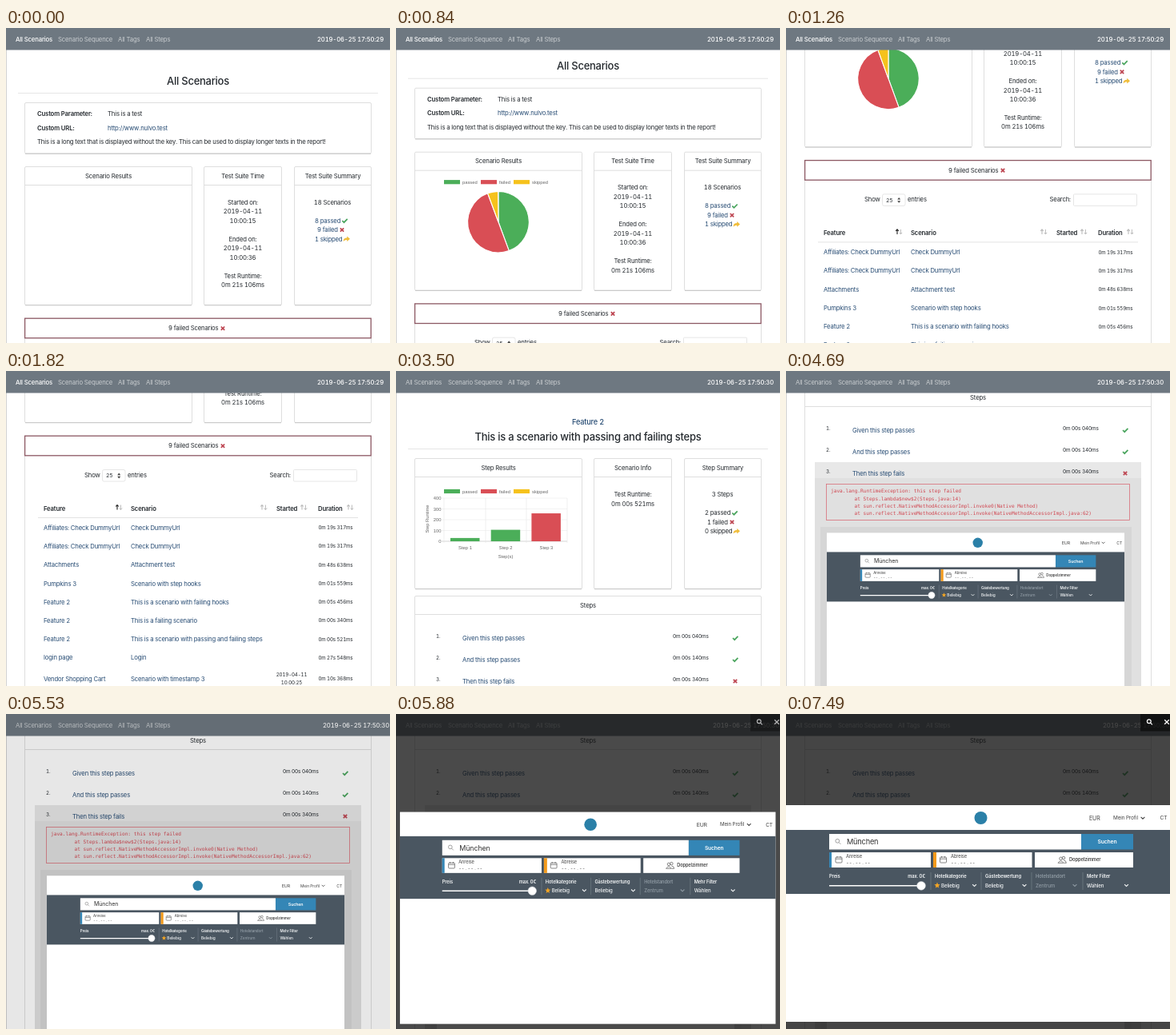
An HTML page that plays this animation: 480 px wide and 394 px high, repeating every 7560 ms.

```html
<!DOCTYPE html>
<html lang="en">
<head>
<meta charset="utf-8">
<title>Test report</title>
<style>
html, body { margin: 0; width: 100%; height: 100%; overflow: hidden; background: #fff; }
svg { display: block; width: 480px; height: 394px; }
text { font-family: Inter, Roboto, sans-serif; letter-spacing: -.02em; font-variant-numeric: tabular-nums; white-space: pre; }
.mono { font-family: "DejaVu Sans Mono", "Liberation Mono", monospace; letter-spacing: 0; }
.chart { font-family: "Liberation Sans", Arial, sans-serif; letter-spacing: 0; }
</style>
</head>
<body>
<svg id="stage" viewBox="0 0 480 394"></svg>
<script>
const LOOP = 7560;
const INK = '#24292e', LINK = '#264b73', LINE = '#dedede', FIELD = '#e6e6e6';
const GREEN = '#4bae59', RED = '#d94e55', YELLOW = '#f6c21c', BLUE = '#3486b6';

// --- drawing helpers (text y is the middle of the line) ---
const text = (x, y, str, { size = 7.7, fill = INK, anchor = 'start', weight = 400, cls = '', more = '' } = {}) =>
  `<text x="${x}" y="${(y + size * .36).toFixed(2)}" font-size="${size}" fill="${fill}" text-anchor="${anchor}" font-weight="${weight}" class="${cls}" ${more}>${str}</text>`;
const mid = (x, y, str, opt) => text(x, y, str, { anchor: 'middle', ...opt });
const end = (x, y, str, opt) => text(x, y, str, { anchor: 'end', ...opt });
const rect = (x, y, w, h, fill, more = '') =>
  `<rect x="${x}" y="${y}" width="${w}" height="${h}" fill="${fill}" ${more}/>`;
const path = (d, stroke, width = 1, more = '') =>
  `<path d="${d}" fill="none" stroke="${stroke}" stroke-width="${width}" ${more}/>`;
const hline = (x1, x2, y, color = LINE, w = 1) => path(`M${x1} ${y}H${x2}`, color, w);
const group = (id, body, more = '') => `<g id="${id}" ${more}>${body}</g>`;

const check = (x, y) => path(`M${x - 3} ${y}l2.2 2.2l4.2 -4.4`, '#48a45c', 1.7);
const cross = (x, y) => path(`M${x - 2.2} ${y - 2.2}l4.4 4.4m0 -4.4l-4.4 4.4`, '#bd4450', 1.7);
const share = (x, y) =>
  `<path d="M${x - 4} ${y + 3}q-.6 -4.6 4.4 -4.6v-2l3.8 3.4l-3.8 3.2v-2q-3 -.2 -4.4 2z" fill="#f0bd3a"/>`;
const chevron = (x, y, color) => path(`M${x - 2.4} ${y - 1.2}l2.4 2.4l2.4 -2.4`, color, 1.1);
const glass = (x, y, color, w = 1) =>
  `<circle cx="${x - .7}" cy="${y - .7}" r="2.4" fill="none" stroke="${color}" stroke-width="${w}"/>` +
  path(`M${x + 1.1} ${y + 1.1}l2.3 2.3`, color, w);
const sortIcon = (x, y, up = '#bbb') =>
  path(`M${x - 2} ${y + 3}v-6m-1.8 2l1.8 -2l1.8 2`, up, 1.1) +
  path(`M${x + 2.4} ${y - 3}v6m-1.8 -2l1.8 2l1.8 -2`, '#bbb', 1);

const card = (x, y, w, h, title, bar = 23) =>
  rect(x + .5, y + .5, w - 1, h - 1, '#fff', `stroke="${LINE}" rx="1.5"`) +
  hline(x + 1, x + w - 1, y + h - .3, '#c6c6c6') +
  (title ? hline(x, x + w, y + bar + .5) + mid(x + w / 2, y + bar / 2 + .3, title) : '');

const summary = (y, total, passed, failed, skipped, fill) =>
  mid(408, y, total) +
  text(386, y + 23, passed, { fill }) + check(423.3, y + 23) +
  text(389, y + 34.5, failed, { fill }) + cross(420, y + 34.5) +
  text(386, y + 46, skipped, { fill }) + share(425.8, y + 46);

const navBar = (id, active, time) => {
  const items = [[12, 'All Scenarios'], [65, 'Scenario Sequence'], [140, 'All Tags'], [175, 'All Steps']];
  return rect(0, 0, 480, 27.5, '#6e7881') +
    items.map(([x, s], i) => text(x, 14, s, { fill: i === active ? '#fff' : '#c9cdd0', weight: i === active ? 500 : 400 })).join('') +
    end(472, 14, time, { fill: '#fff', weight: 500, more: `id="${id}"` });
};

const legend = y => [[60, GREEN, 'passed'], [106, RED, 'failed'], [147, YELLOW, 'skipped']]
  .map(([x, c, s]) => rect(x, y - 2.6, 20, 5.2, c) + text(x + 23, y, s, { size: 5.8, fill: '#666', cls: 'chart' })).join('');

// --- overview page ---
function overview() {
  const bold = { weight: 600 };
  const rows = [
    ['Affiliates: Check DummyUrl', 'Check DummyUrl', '0m 19s 317ms', 478],
    ['Affiliates: Check DummyUrl', 'Check DummyUrl', '0m 19s 317ms', 501],
    ['Attachments', 'Attachment test', '0m 48s 638ms', 524.5],
    ['Pumpkins 3', 'Scenario with step hooks', '0m 01s 559ms', 548],
    ['Feature 2', 'This is a scenario with failing hooks', '0m 05s 456ms', 571],
    ['Feature 2', 'This is a failing scenario', '0m 00s 340ms', 594],
    ['Feature 2', 'This is a scenario with passing and failing steps', '0m 00s 521ms', 617.3],
    ['login page', 'Login', '0m 27s 548ms', 640.5],
    ['Vendor Shopping Cart', 'Scenario with timestamp 3', '0m 10s 368ms', 667]
  ];
  const times = [[218, 'Started on:'], [229.5, '2019-04-11'], [241, '10:00:15'], [264, 'Ended on:'],
    [275.5, '2019-04-11'], [287, '10:00:36'], [310, 'Test Runtime:'], [321.3, '0m 21s 106ms']];
  return mid(240, 66, 'All Scenarios', { size: 13, weight: 500 }) + hline(15, 465, 81.5, '#e6e6e6') +
    card(23, 93, 434, 64.5) +
    text(39, 107.5, 'Custom Parameter:', bold) + text(127, 107.5, 'This is a test') +
    text(39, 125, 'Custom URL:', bold) + text(127, 125, 'http://www.nulvo.test', { fill: LINK }) +
    text(39, 142.5, 'This is a long text that is displayed without the key. This can be used to display longer texts in the report!') +
    card(23, 173, 210, 174, 'Scenario Results') + card(247, 173, 98, 174, 'Test Suite Time') +
    card(360, 173, 97, 174, 'Test Suite Summary') +
    group('pieChart', legend(211) + group('pie', '')) +
    times.map(([y, s]) => mid(296, y, s)).join('') +
    summary(218, '18 Scenarios', '8 passed', '9 failed', '1 skipped', LINK) +
    path('M23.5 388V760M456.5 388V760', LINE) +
    rect(23.6, 363.2, 432.6, 24.6, '#fff', 'stroke="#8c5863" stroke-width="1.3"') +
    text(203, 375.7, '9 failed Scenarios') + cross(271, 375.7) +
    text(98, 412, 'Show') + text(152, 412, 'entries') +
    rect(120.5, 405.5, 28.5, 14.5, '#fff', `stroke="${FIELD}" rx="2"`) + text(125, 413, '25', { size: 6.8 }) +
    `<path d="M139.2 412.2l2 -2.6l2 2.6zM139.2 413.8l2 2.6l2 -2.6z" fill="#444"/>` +
    end(356, 412, 'Search:') + rect(359.5, 405.5, 79, 14.5, '#fff', `stroke="${FIELD}" rx="1"`) +
    [[47, 'Feature'], [156, 'Scenario'], [338, 'Started'], [390, 'Duration']].map(([x, s]) => text(x, 454, s, bold)).join('') +
    sortIcon(141, 452.5, '#222') + [322, 372, 430].map(x => sortIcon(x, 452.5)).join('') +
    hline(40, 440, 465.5, '#e2e2e2') +
    rows.map(([f, s, d, y], i) => text(47, y, f, { fill: LINK }) +
      text(156, y, s, { fill: LINK, more: i === 6 ? 'id="target"' : '' }) +
      end(433.5, y, d, { size: 6.16 })).join('') +
    mid(357, 662, '2019-04-11', { size: 6.16 }) + mid(357, 672, '10:00:25', { size: 6.16 });
}

// --- screenshot shown as thumbnail and in the lightbox, 480 x 271 ---
function screenshot() {
  const pale = '#f4f6f7', dim = '#8f9aa3', gray = '#444';
  const small = { size: 5.8, fill: gray };
  const filters = [[186, 'Hotelkategorie', 'Beliebig', 194], [249, 'Gästebewertung', 'Beliebig', 249],
    [312, 'Hotelstandort', 'Zentrum', 312], [376, 'Mehr Filter', 'Wählen', 376]];
  const calendar = x => rect(x - 4, 65, 8, 7, 'none', 'stroke="#666" stroke-width=".8" rx="1"') +
    path(`M${x - 4} 67.2h8M${x - 2} 63.8v2M${x + 2} 63.8v2`, '#666', .8);
  return rect(0, 0, 480, 271, '#fff') + `<circle cx="243.5" cy="16" r="8" fill="#2b80a8"/>` +
    text(379, 16, 'EUR', { size: 7, fill: gray }) + text(409, 16, 'Mein Profil', { size: 6.4, fill: gray }) +
    chevron(446, 16, gray) + text(467.5, 16, 'CT', { size: 6.6, fill: gray }) +
    rect(0, 31, 480, 80, '#4a5661') +
    rect(54, 36, 315, 19.5, '#fff') + glass(65, 45.5, '#888', .8) + text(76, 45.8, 'München', { size: 9.2, fill: '#333' }) +
    rect(369, 36, 65, 19.5, BLUE) + mid(401.5, 45.8, 'Suchen', { size: 6.8, fill: '#fff', weight: 600 }) +
    rect(54, 59, 127, 19, '#fff') + rect(54, 59, 3, 19, BLUE) + calendar(66) +
    text(75, 64.3, 'Anreise', small) + text(75, 71.8, '-- . -- . --', small) +
    rect(184, 59, 123.5, 19, '#fff') + rect(184, 59, 4, 19, '#f39a1b') + calendar(196.5) +
    text(206, 64.3, 'Abreise', small) + text(206, 71.8, '-- . -- . --', small) +
    rect(311, 59, 123, 19, '#fff') +
    `<g fill="none" stroke="#666" stroke-width=".8"><circle cx="343.5" cy="66.8" r="1.8"/><circle cx="347" cy="66" r="1.8"/></g>` +
    path('M340 72.3q3.3 -5 7 0zM347 69q3 0 3.4 3.3h-3', '#666', .8) +
    text(354, 68.3, 'Doppelzimmer', { size: 5.8, weight: 600, fill: gray }) +
    text(54, 89, 'Preis', { size: 5.8, weight: 600, fill: pale }) +
    end(174, 89, 'max. 0€', { size: 5.8, weight: 600, fill: pale }) +
    hline(54, 168, 100.8, '#fff', 1.6) + `<circle cx="169" cy="100.8" r="5.4" fill="#fff" stroke="#cfd4d8" stroke-width=".5"/>` +
    filters.map(([x, head, val, vx], i) => {
      const fill = i === 2 ? dim : pale;
      return path(`M${x - 5} 84V106`, '#6f7b85', .8) + text(x, 89, head, { size: 5.8, weight: 600, fill }) +
        text(vx, 100.3, val, { size: 6.2, weight: 500, fill }) + chevron([235.5, 298, 361, 425.5][i], 100.3, fill);
    }).join('') +
    `<path d="M189 96.6l1 2.5l2.6 .2l-2 1.7l.6 2.6l-2.2 -1.4l-2.2 1.4l.6 -2.6l-2 -1.7l2.6 -.2z" fill="#f5a623"/>`;
}

// --- scenario page ---
function scenario() {
  const tiny = { size: 5.8, fill: '#666', cls: 'chart' };
  const steps = [['Given this step passes', '0m 00s 040ms', 333.5], ['And this step passes', '0m 00s 140ms', 360.5],
    ['Then this step fails', '0m 00s 340ms', 387.5]];
  const trace = [[56, 'java.lang.RuntimeException: this step failed'], [85.5, 'at Steps.lambda$new$2(Steps.java:14)'],
    [85.5, 'at sun.reflect.NativeMethodAccessorImpl.invoke0(Native Method)'],
    [85.5, 'at sun.reflect.NativeMethodAccessorImpl.invoke(NativeMethodAccessorImpl.java:62)']];
  const grid = [0, 1, 2, 3, 4].map(i => hline(57, 214, 213 - i * 13.5, i ? '#ebebeb' : '#bbb', .6) +
    end(56.5, 213 - i * 13.5, i * 100, tiny)).join('') +
    path('M60 159V215M112 159V215M163 159V215M214 159V215', '#e6e6e6', .6);
  const details = rect(36, 374, 408, 20, '#e8e8e8') + rect(36, 394, 408, 60, '#e0e0e0') +
    group('backdrop', rect(36, 454, 408, 240, '#e0e0e0') + rect(43, 455, 389, 225, '#d6d6d6')) +
    rect(50.5, 401.5, 379, 45, 'none', 'stroke="#d9707a" stroke-width=".8"') +
    trace.map(([x, s], i) => text(x, 410.2 + i * 9.3, s, { size: 6.16, fill: '#d04650', cls: 'mono' })).join('') +
    `<g transform="translate(51 462.4) scale(.775)">${screenshot()}</g>`;
  return mid(240, 63.5, 'Feature 2', { size: 9.2, weight: 500, fill: LINK }) +
    mid(240, 82, 'This is a scenario with passing and failing steps', { size: 13, weight: 500 }) +
    hline(15, 465, 97.5, '#e6e6e6') +
    card(23, 109, 210, 164, 'Step Results') + card(247, 109, 98, 164, 'Scenario Info') + card(360, 109, 97, 164, 'Step Summary') +
    group('barChart', legend(150.5) + grid +
      [GREEN, GREEN, RED].map((c, i) => rect(68 + i * 50.7, 213, 36.5, 0, c, 'class="bar"') + mid(86.5 + i * 50.7, 220.8, 'Step ' + (i + 1), tiny)).join('') +
      mid(137, 232, 'Step(s)', tiny) + mid(39, 185, 'Step Runtime', { ...tiny, more: 'transform="rotate(-90 39 185)"' })) +
    mid(296, 154.5, 'Test Runtime:') + mid(296, 166, '0m 00s 521ms') +
    summary(154.5, '3 Steps', '2 passed', '1 failed', '0 skipped', INK) +
    card(23, 281, 434, 500, 'Steps') +
    group('details', details, 'clip-path="url(#fold)"') +
    steps.map(([s, d, y], i) => text(50, y - 1.5, i + 1 + '.', { size: 6.2 }) + text(83, y + .3, s, { fill: LINK }) +
      text(346, y - 1.7, d, { size: 6.4 }) + (i < 2 ? check : cross)(424, y + .5)).join('');
}

const edge = rect(0, 0, 1, 394, '#d2d2d2');
document.getElementById('stage').innerHTML =
  '<clipPath id="fold"><rect id="foldBox" x="36" y="374" width="408" height="0"/></clipPath>' +
  rect(0, 0, 480, 394, '#fff') +
  group('pageA', group('scrollA', overview()) + edge + navBar('dateA', 0, '2019-06-25 17:50:29')) +
  group('pageB', group('scrollB', scenario()) + edge + navBar('dateB', -1, '2019-06-25 17:50:30')) +
  rect(0, 0, 480, 394, '#111', 'id="shade"') +
  group('zoom', screenshot()) +
  group('tools', rect(443, 0, 37, 21.5, '#000', 'opacity=".55"') + glass(454.5, 10, '#fff', 1.2) +
    path('M473.2 7.2l5.6 5.6m0 -5.6l-5.6 5.6', '#fff', 1.3));

// --- motion ---
const $ = id => document.getElementById(id);
const set = (id, name, value) => $(id).setAttribute(name, value);
const show = (id, on) => set(id, 'display', on ? 'inline' : 'none');
const span = (t, from, length) => Math.min(1, Math.max(0, (t - from) / length));
const outQuad = p => 1 - (1 - p) ** 2;
const outQuart = p => 1 - (1 - p) ** 4;
const inOut = p => p < .5 ? 2 * p * p : 1 - 2 * (1 - p) ** 2;
const mix = (a, b, p) => a + (b - a) * p;
const bars = document.querySelectorAll('.bar');

function pie(p) {
  const cx = 128, cy = 261, r = 38.3;
  const at = a => `${(cx + r * Math.sin(a)).toFixed(2)} ${(cy - r * Math.cos(a)).toFixed(2)}`;
  let from = 0;
  return [[8, GREEN], [9, RED], [1, YELLOW]].map(([n, color]) => {
    const to = from + n / 18 * 2 * Math.PI * p;
    const d = `M${cx} ${cy}L${at(from)}A${r} ${r} 0 ${to - from > Math.PI ? 1 : 0} 1 ${at(to)}Z`;
    from = to;
    return `<path d="${d}" fill="${color}" stroke="#fff" stroke-width="1.1"/>`;
  }).join('');
}

function render(t) {
  const first = t < 3080;
  show('pageA', first);
  show('pageB', !first);

  if (first) {
    const grown = outQuart(span(t, 35, 1000));
    show('pieChart', grown > 0);
    $('pie').innerHTML = pie(grown);
    set('scrollA', 'transform', `translate(0 ${-282 * outQuad(span(t, 808, 1000))})`);
    set('target', 'text-decoration', t >= 2730 ? 'underline' : 'none');
  } else {
    const grown = outQuart(span(t, 3200, 1000));
    show('barChart', grown > 0);
    bars.forEach((bar, i) => {
      const h = [40, 140, 340][i] * .135 * grown;
      bar.setAttribute('y', 213 - h);
      bar.setAttribute('height', h);
    });
    set('foldBox', 'height', t < 3780 ? 0 : mix(27, 320, inOut(span(t, 3850, 350))));
    set('backdrop', 'opacity', span(t, 4290, 140));
    set('scrollB', 'transform', `translate(0 ${-260 * outQuad(span(t, 4005, 670))})`);
    set('dateB', 'x', t < 5390 ? 472 : 479);
  }

  set('shade', 'opacity', .78 * inOut(span(t, 5390, 560)));
  const z = inOut(span(t, 5530, 450));
  show('zoom', t >= 5390);
  set('zoom', 'transform', `translate(${mix(51, 0, z)} ${mix(202.4, 114, z)}) scale(${mix(.775, 1, z)})`);
  set('tools', 'opacity', span(t, 5700, 280));
}

const start = performance.now();
function tick() {
  render((performance.now() - start) % LOOP);
  requestAnimationFrame(tick);
}
tick();
</script>
</body>
</html>
```
